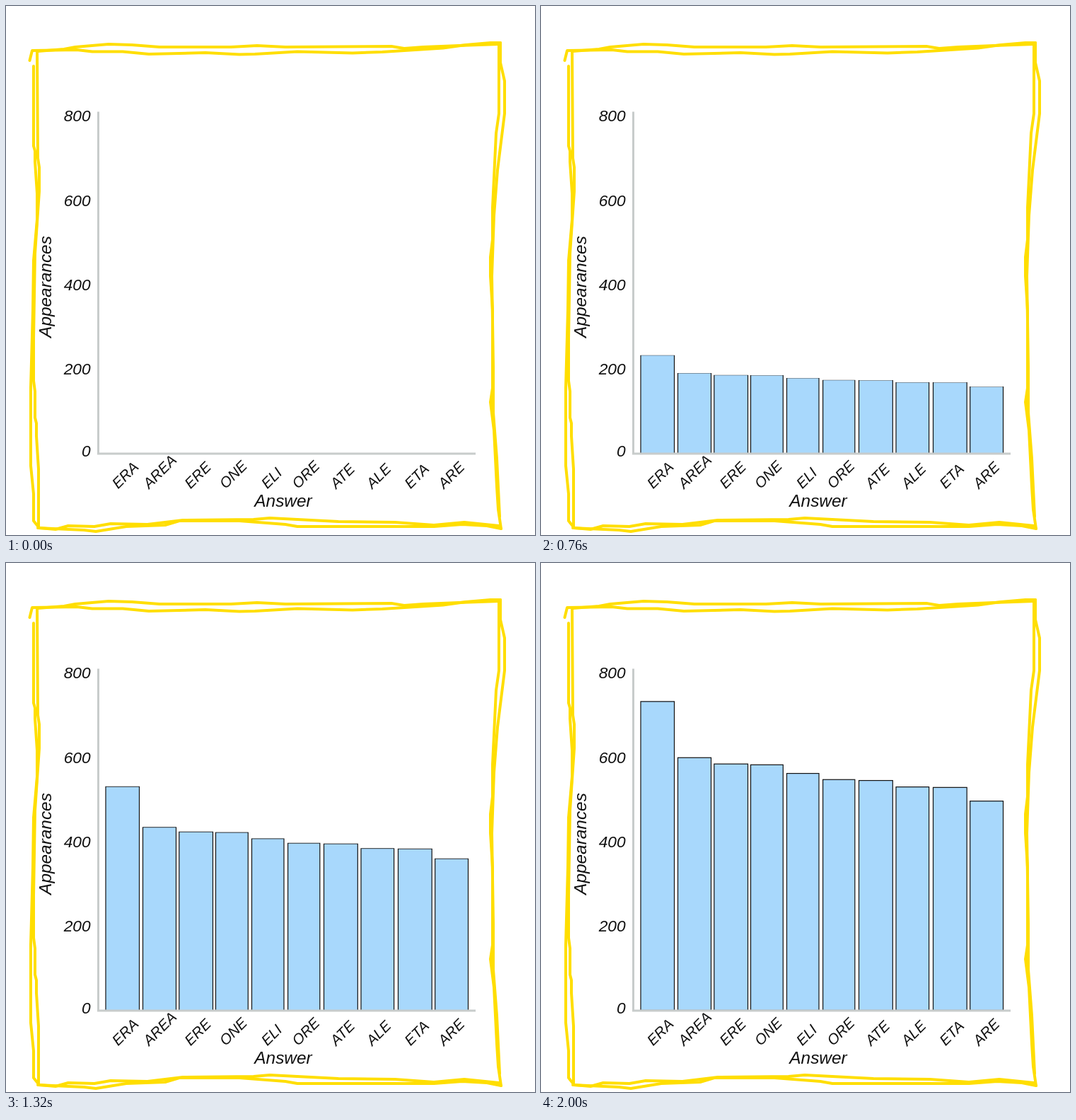
Animation of 748x748 px, one loop 4.96 s. Source, as an HTML page:

```html
<!DOCTYPE html>
<html lang="en">
<head>
<meta charset="utf-8">
<title>Answer appearances</title>
<style>
  html, body { margin: 0; width: 100%; height: 100%; overflow: hidden; background: #fff; }
  svg { display: block; width: 100%; height: 100%; }
  text { font-family: "Liberation Sans", Arial, sans-serif; font-style: italic; fill: #111; }
  .frame { fill: none; stroke: #ffde00; stroke-width: 4; stroke-linejoin: round; stroke-linecap: round; }
  .axis { fill: none; stroke: #c8cccb; stroke-width: 3; }
  #bars rect { fill: #a8d8fc; stroke: #111; stroke-width: 1.2; }
  #ticks { font-size: 22.7px; text-anchor: end; }
  #labels { font-size: 20.8px; }
  .title { font-size: 24.4px; text-anchor: middle; }
</style>
</head>
<body>
<svg viewBox="0 0 748 748">
  <g class="frame">
    <path d="M45 64L82 61 98 58 145 54 178 55 217 58H318L355 56 395 58 545 57 563 60 590 58 640 56 697 54"/>
    <path d="M33.5 77L37 63 100 62 122 64.5H165L202 68 282 66 330 68.5 352 68 412 64.5 490 66.5 532 65 618 59.5 650 55 685 52H699"/>
    <path d="M699 52V80L705 106V152L695 232 690 296 687 382 689 510 689 575 694 640 698 722"/>
    <path d="M697 54V152L693 180 688 285V330L685 355V382L688 430V540L685 560 690 600 694 680 696 712 700 739"/>
    <path d="M700 739L680 735 645 733 605 736 412 736 395 733 330 728H245L225 734 170 736 127 743 110 741 45 738"/>
    <path d="M697 735L648 730 605 734 550 730 470 729 373 724 350 726 250 727 200 733 148 732 125 736 88 735 70 740 47 738"/>
    <path d="M39 85V198L41 205V220L44 265V302L39 360 38 430 35 540V650L39 690V728L47 738"/>
    <path d="M44 63L45 215 47 228V262L41 350 39 470V530L41 545V582L43 590V608L46 655V738"/>
  </g>
  <g id="bars"></g>
  <path class="axis" d="M130.5 149.5V633H664"/>
  <g id="ticks"></g>
  <g id="labels"></g>
  <text class="title" x="392" y="708">Answer</text>
  <text class="title" transform="translate(64 397) rotate(-90)">Appearances</text>
</svg>
<script>
const LOOP = 4960, STEP = 40, BASE = 632.5;

// label, label x, bar left, bar right, full bar top
const rows = [
  ["ERA", 158.5, 141, 188.5, 195.8],
  ["AREA", 202.5, 193.5, 240.5, 275.2],
  ["ERE", 261, 244.8, 292.5, 284.1],
  ["ONE", 310.5, 296.5, 342.3, 285.3],
  ["ELI", 369.5, 347.5, 393, 297.5],
  ["ORE", 413, 398.6, 443.8, 306.2],
  ["ATE", 467, 449.5, 497.3, 307.5],
  ["ALE", 518, 502, 548.6, 316.6],
  ["ETA", 572, 554.5, 602.2, 317.3],
  ["ARE", 619.5, 606.7, 653.5, 336.6]
];
const ticks = [[800, 155], [600, 275.5], [400, 394.5], [200, 513.5], [0, 629]];

const get = id => document.getElementById(id);

function add(parent, tag, attrs, text = "") {
  const el = document.createElementNS("http://www.w3.org/2000/svg", tag);
  for (const key in attrs) el.setAttribute(key, attrs[key]);
  el.textContent = text;
  parent.appendChild(el);
}

const bars = get("bars");
for (const [word, labelX, left, right, top] of rows) {
  add(bars, "rect", { x: left, y: top - BASE, width: right - left, height: BASE - top });
  add(get("labels"), "text", { transform: `translate(${labelX} 683.5) rotate(-45)` }, word);
}
for (const [value, y] of ticks) add(get("ticks"), "text", { x: 119.5, y: y + 7.6 }, value);

function growth(t) {
  const p = Math.min(1, Math.max(0, (t - 6) / 2008));
  return p * p * (3 - 2 * p);
}

function draw(time) {
  const t = Math.floor((time % LOOP) / STEP) * STEP;
  const s = growth(t);
  bars.setAttribute("visibility", s ? "visible" : "hidden");
  bars.setAttribute("transform", `translate(0 ${BASE}) scale(1 ${s})`);
}

let start;
function tick(now) {
  start ??= now;
  draw(now - start);
  requestAnimationFrame(tick);
}
draw(0);
requestAnimationFrame(tick);
</script>
</body>
</html>
```
